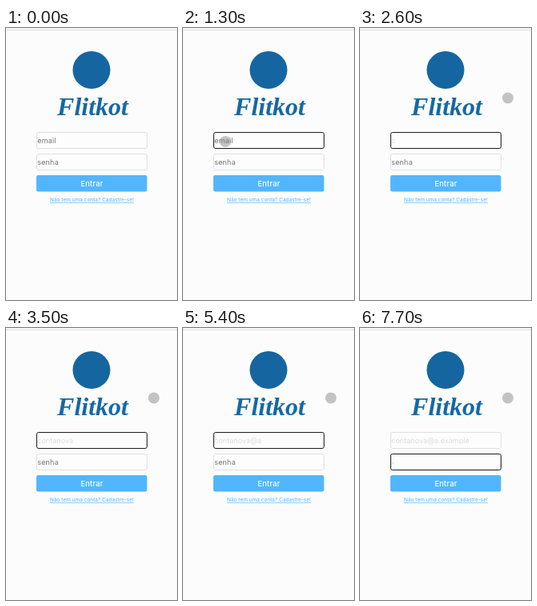
Recreate the animation shown at these times as an HTML page. Size 214 by 340 pixels, loop 8 s.

```html
<!DOCTYPE html>
<html lang="pt">
<head>
<meta charset="utf-8">
<title>Entrar</title>
<style>
  html, body { margin: 0; width: 100%; height: 100%; overflow: hidden; background: #fcfcfc; }
  svg { display: block; width: 100vw; height: 100vh; }
  text { font: 9.1px Inter, "Noto Sans", sans-serif; letter-spacing: .15px; fill: #757575; }
  .field { fill: #fdfdfd; stroke: #e0e0e0; stroke-width: 1; }
  .field.focus { stroke: #1c1c1c; }
  .typed { fill: #dbdbdb; letter-spacing: 0; }
  .brand { font: italic bold 32px "Liberation Serif", serif; letter-spacing: 0; fill: #1569a3; }
  .enter { font-size: 9.4px; font-weight: 500; fill: #fff; }
  .link { font-size: 6.5px; letter-spacing: 0; fill: #52b6ff; text-decoration: underline; }
</style>
</head>
<body>
<svg viewBox="0 0 214 340">
  <rect width="214" height="2" fill="#f6f6f6"/>
  <rect y="2" width="214" height="1" fill="#e4e4e4"/>
  <circle cx="107" cy="52.5" r="23.5" fill="#1566a0"/>
  <text class="brand" x="108.5" y="109" text-anchor="middle">Flitkot</text>

  <rect id="emailBox" class="field" x="38.5" y="130.5" width="138" height="20" rx="2.3"/>
  <text id="email" x="39.2" y="144"></text>
  <rect id="passBox" class="field" x="38.5" y="157.5" width="138" height="20" rx="2.3"/>
  <text id="pass" x="39.2" y="171"></text>

  <rect x="38" y="184" width="138.5" height="20.6" rx="2.3" fill="#52b6ff"/>
  <text class="enter" x="107.5" y="198" text-anchor="middle">Entrar</text>
  <text class="link" x="107.5" y="217.3" text-anchor="middle">Não tem uma conta? Cadastre-se!</text>
  <circle id="touch" r="7" fill="#808080" fill-opacity=".46"/>
</svg>
<script>
const LOOP = 8000, STEP = 100, KEY_GAP = 120;
const ENTER = 100, CLICK = 1300, TAB = 7200;

// bursts of typing, one key every KEY_GAP ms
const emailBursts = [
  { at: 2500, text: "contanova" }, { at: 4400, text: "@" }, { at: 5400, text: "a" },
  { at: 5800, text: ".exa" }, { at: 6600, text: "mpl" }, { at: TAB, text: "e" }
];
const passBursts = [{ at: 7600, text: "••" }];

// pointer moves; sag bends the line downwards
const home = { x: 173, y: 42 };
const moves = [
  { from: ENTER, to: 600, x: 32.5, y: 160, sag: 75 },
  { from: 600, to: 800, x: 40, y: 146, sag: 0 },
  { from: 1000, to: 1100, x: 53, y: 142, sag: 0 },
  { from: CLICK, to: 1700, x: 185, y: 87.5, sag: 0 }
];

const $ = id => document.getElementById(id);
const clamp = k => Math.min(1, Math.max(0, k));

function typed(bursts, t) {
  return bursts.map(({ at, text }) =>
    text.slice(0, Math.max(0, Math.floor((t - at) / KEY_GAP) + 1))).join("");
}

function pointer(t) {
  let { x, y } = home;
  for (const m of moves) {
    const k = clamp((t - m.from) / (m.to - m.from));
    x += (m.x - x) * k;
    y += (m.y - y) * k + m.sag * Math.sin(Math.PI * k);
  }
  return { x, y };
}

function show(id, value, hint) {
  $(id).textContent = value || hint;
  $(id).classList.toggle("typed", value !== "");
}

function draw(now) {
  const t = Math.floor(now % LOOP / STEP) * STEP;
  const dots = typed(passBursts, t);
  show("email", typed(emailBursts, t), "email");
  show("pass", dots, "senha");
  $("pass").style.fontSize = dots ? "7px" : "";
  $("emailBox").classList.toggle("focus", t >= CLICK && t < TAB);
  $("passBox").classList.toggle("focus", t >= TAB);

  const { x, y } = pointer(t);
  $("touch").style.display = t < ENTER ? "none" : "";
  $("touch").setAttribute("cx", x);
  $("touch").setAttribute("cy", y);
}

const start = performance.now();
function tick() {
  draw(performance.now() - start);
  requestAnimationFrame(tick);
}
tick();
</script>
</body>
</html>
```
